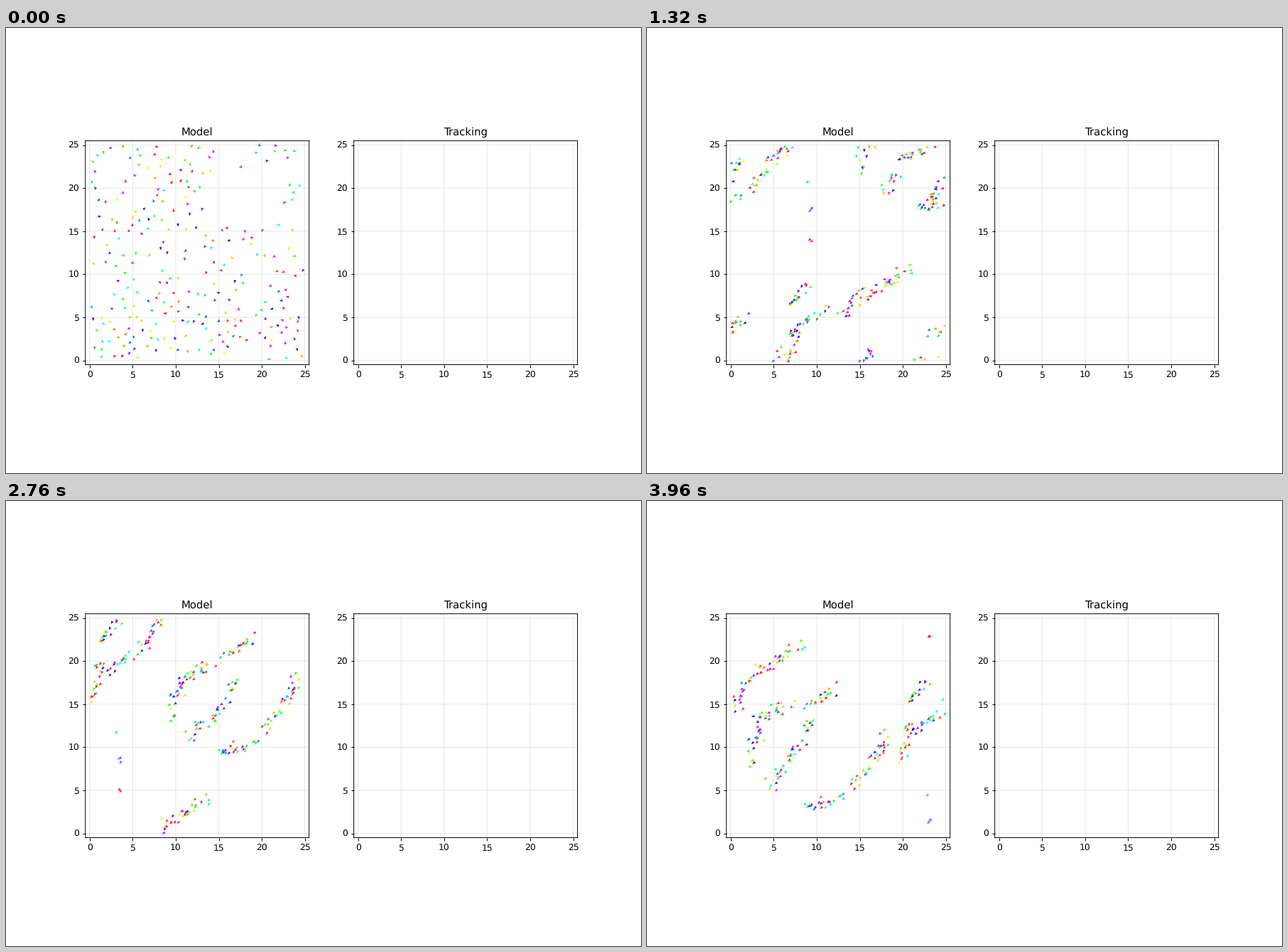
A matplotlib script that plays this animation: 894x626 px, repeating every 4000 ms.

```python
import numpy as np
import matplotlib.pyplot as plt
from matplotlib.animation import FuncAnimation

W, H, DPI = 894, 626, 89.4
FRAMES, INTERVAL = 100, 40
SIZE, SPEED = 25, 0.3
ANCHOR = 69      # frame in which the flocks lie along their segments
DENSITY = 4.2    # birds per unit of flock length

# both ends of each flock
FLOCKS = [
    (8 + 0.5j, 14 + 4.2j), (6.3 + 22j, 8.5 + 25j), (1.8 + 19j, 6.2 + 21.5j),
    (0.3 + 15.3j, 1.3 + 20j), (1.4 + 22.6j, 3.9 + 25j), (20.5 + 12j, 24.6 + 18.3j),
    (15 + 9.2j, 20 + 10.8j), (10.2 + 17.6j, 15 + 20j), (15.4 + 20.8j, 19.4 + 22.8j),
    (9.2 + 13.2j, 10.8 + 17.8j), (11.3 + 10.8j, 13.3 + 13.3j), (14 + 12.6j, 17.1 + 18j),
]
STRAGGLERS = (3.2 + 2.2j, 3.7 + 12.6j)

rng = np.random.default_rng(11)
steps = np.arange(FRAMES)
scatter = np.clip((32 - steps) / 24, 0, 1) ** 1.5   # disorder fades as birds align


def course(mid):
    """Heading of a flock over time; those near the middle bend further west."""
    bend = 24 * np.exp(-abs(mid - (14 + 17j)) ** 2 / 50)
    early = rng.uniform(-195, -95)
    return np.radians(np.interp(steps, (38, 52, 80), (early, -115 - bend, -128 - bend)))


def trail(heading, place):
    """Path of one bird that stands at `place` in the anchor frame."""
    path = np.cumsum(SPEED * np.exp(1j * heading))
    return path - path[ANCHOR] + place


def wrap(z):
    return z.real % SIZE + 1j * (z.imag % SIZE)


def gap(a, b):
    """Shortest distance on the periodic square."""
    d = wrap(a - b + SIZE / 2 * (1 + 1j)) - SIZE / 2 * (1 + 1j)
    return abs(d)


def make_birds():
    paths, headings = [], []
    for a, b in FLOCKS + [STRAGGLERS]:
        stray = (a, b) == STRAGGLERS
        count = 6 if stray else round(DENSITY * abs(b - a))
        flow = course((a + b) / 2)
        for u in rng.uniform(0, 1, count):
            place = a + u * (b - a) + complex(*rng.normal(0, 0.33, 2))
            wobble = rng.normal(0, 0.1, FRAMES)
            # of a few first headings take the one that starts in open space
            best = -1
            for turn in rng.uniform(-np.pi, np.pi, 10):
                h = flow + wobble + turn * scatter
                p = trail(h, place)
                room = min([0.7] + [gap(q[0], p[0]) for q in paths])
                if room > best:
                    best, path, heading = room, p, h
            paths.append(path)
            headings.append(heading)
    return wrap(np.array(paths)), np.array(headings)


pos, head = make_birds()
hues = rng.random(len(pos))

plt.rcParams.update({"path.snap": False, "text.hinting": "none"})
fig, axes = plt.subplots(1, 2, figsize=((W + 0.01) / DPI, (H + 0.01) / DPI), dpi=DPI)
for ax, name in zip(axes, ("Model", "Tracking")):
    ax.set_title(name)
    ax.set_aspect("equal")
    ax.set(xlim=(-0.5, SIZE + 0.5), ylim=(-0.5, SIZE + 0.5))
    ax.set_xticks(range(0, SIZE + 1, 5))
    ax.set_yticks(range(0, SIZE + 1, 5))
    ax.grid(alpha=0.3)

birds = axes[0].quiver(pos[:, 0].real, pos[:, 0].imag,
                       np.cos(head[:, 0]), np.sin(head[:, 0]), hues,
                       cmap="hsv", clim=(0, 1), scale=68, width=0.004, headwidth=4)


def update(i):
    birds.set_offsets(np.column_stack((pos[:, i].real, pos[:, i].imag)))
    birds.set_UVC(np.cos(head[:, i]), np.sin(head[:, i]))
    return birds,


anim = FuncAnimation(fig, update, frames=FRAMES, interval=INTERVAL,
                     repeat=True, repeat_delay=0)
plt.show()
```
